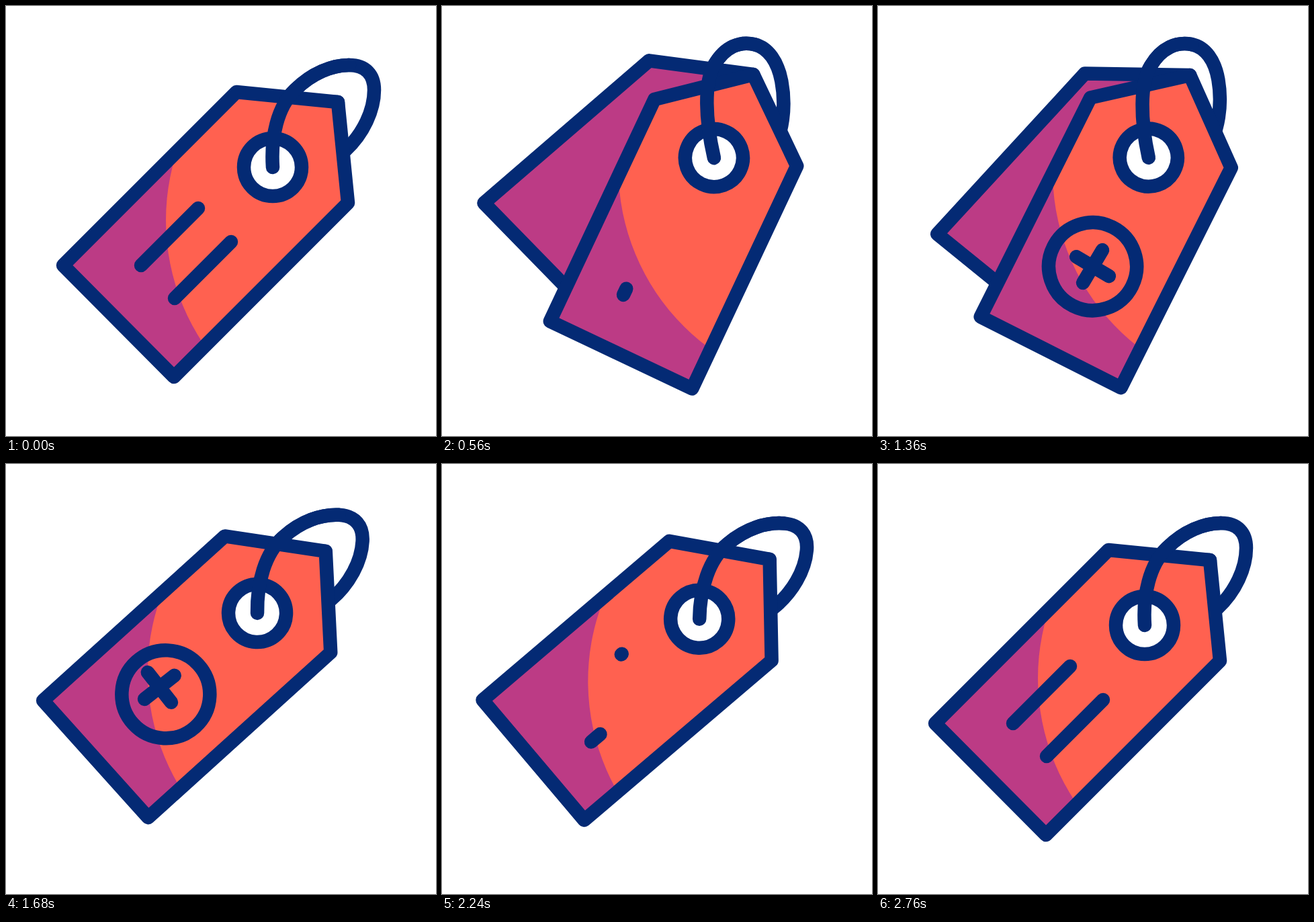
An HTML page for the animation above (3000 ms loop, 640 by 640 pixels).

```html
<!DOCTYPE html>
<html lang="en">
<head>
<meta charset="utf-8">
<title>Price tag</title>
<style>
  html, body { margin: 0; width: 100%; height: 100%; overflow: hidden; background: #fff; }
  svg { display: block; width: 100vw; height: 100vh; }
  .line { fill: none; }
  .line, .edge { stroke: #042a74; stroke-width: 20.5; stroke-linecap: round; stroke-linejoin: round; }
</style>
</head>
<body>
<svg viewBox="0 0 640 640">
  <defs>
    <!-- tag coordinates are relative to the centre of the hole -->
    <path id="shape" d="M-54-112 97-97 112 53-147 312-312 146Z"/>
    <clipPath id="inside"><use href="#shape"/></clipPath>
  </defs>
  <g id="tag">
    <path id="cord" class="line"/>
    <path id="back" class="edge" fill="#bc3b85" d="M-155-21.5 0 0-12 110-263 333-402 189Z"/>
    <g clip-path="url(#inside)">
      <use href="#shape" fill="#bc3b85"/>
      <circle cx="172" cy="79" r="331" fill="#ff6150"/>
      <path id="lineA" class="line"/>
      <path id="lineB" class="line"/>
      <path id="ring" class="line"/>
      <path id="cross" class="line" d="M-18.6-21.4 18.6 21.4M21.4-18.6-21.4 18.6"/>
    </g>
    <use href="#shape" class="line"/>
    <circle class="edge" r="43" fill="#fff"/>
    <path id="cordTop" class="line"/>
  </g>
</svg>
<script>
const LOOP = 3000, STEP = 40, RAD = Math.PI / 180;
const el = id => document.getElementById(id);
const set = (id, name, value) => el(id).setAttribute(name, value);
const mix = (a, b, k) => a + (b - a) * k;
const text = p => p.map(v => v.toFixed(2)).join(" ");

// Cubic ease in and out, 0 before `from` and 1 after `to`
function ease(t, from, to) {
  const p = Math.min(1, Math.max(0, (t - from) / (to - from)));
  return p < 0.5 ? 4 * p ** 3 : 1 - 4 * (1 - p) ** 3;
}

// The tag swings from rest to hanging, is kicked up, then settles at rest
function swing(t, rest, hang, kick, settled) {
  const low = mix(rest, hang, ease(t, 110, 630));
  const high = mix(low, kick, ease(t, 1172, 1927));
  return mix(high, rest, ease(t, 1927, settled));
}

// Cubic curve through the resting cord; a hanging tag pulls it into a slant
const cord = [[0, 0], [-3, -45], [7, -90], [33, -115], [58, -140], [88, -152], [114, -152],
  [138, -152], [151, -138], [151, -115], [151, -85], [135, -50], [108, -25]];

function drawCord(pull) {
  const pts = cord.map(([x, y]) => text([
    x - pull * (0.28 * x + 0.21 * y),
    y + pull * (0.49 * x + 0.277 * y)
  ]));
  const curve = list => `M${list[0]}C${list.slice(1).join(" ")}`;
  set("cord", "d", curve(pts));
  set("cordTop", "d", curve(pts.slice(0, 7)));
}

function drawLine(id, a, b, from, to) {
  const at = k => text([mix(a[0], b[0], k), mix(a[1], b[1], k)]);
  set(id, "d", to - from < 0.001 ? "" : `M${at(from)}L${at(to)}`);
}

// Grows both ways from the foot of the tag until the ends meet
function drawRing(k) {
  const point = deg => text([-130 + 65.5 * Math.cos(deg * RAD), 127.5 + 65.5 * Math.sin(deg * RAD)]);
  const arc = deg => `A65.5 65.5 0 0 1 ${point(deg)}`;
  set("ring", "d", k < 0.002 ? "" : `M${point(135 - 180 * k)}${arc(135)}${arc(135 + 180 * k)}`);
}

function draw(t) {
  const x = swing(t, 397, 405, 369, 2550);
  const y = swing(t, 240, 226, 221.3, 2550);
  const angle = swing(t, 0, -20, 6.6, 2664);
  const spread = -6.5 + 26.5 * (ease(t, 121, 650) - ease(t, 1160, 1622));
  set("tag", "transform", `translate(${text([x, y])}) rotate(${angle.toFixed(2)})`);
  set("back", "transform", `translate(97 -97) rotate(${spread.toFixed(2)})`);
  drawCord(Math.max(0, -angle / 20) ** 1.4);

  // The lines wipe away first and are drawn again after the ring has gone
  const again = t > 1500;
  const wipe = start => again ? 0 : ease(t, start, start + 290);
  const grow = start => again ? ease(t, start, start + 450) : 1;
  drawLine("lineA", [-111, 61], [-196, 146], wipe(350), grow(2180));
  drawLine("lineB", [-146, 195], [-62, 111], wipe(260), grow(2090));
  drawRing(ease(t, 530, 955) - ease(t, 1690, 2110));

  // The cross slides through the tag, waiting in the ring
  const off = 117 * (1 - ease(t, 600, 909) - ease(t, 1600, 1889));
  set("cross", "transform", `translate(${text([off - 130, off + 127.5])})`);
}

const begin = performance.now();
function frame() {
  const t = (performance.now() - begin) % LOOP;
  draw(Math.floor(t / STEP) * STEP);
  requestAnimationFrame(frame);
}
frame();
</script>
</body>
</html>
```
